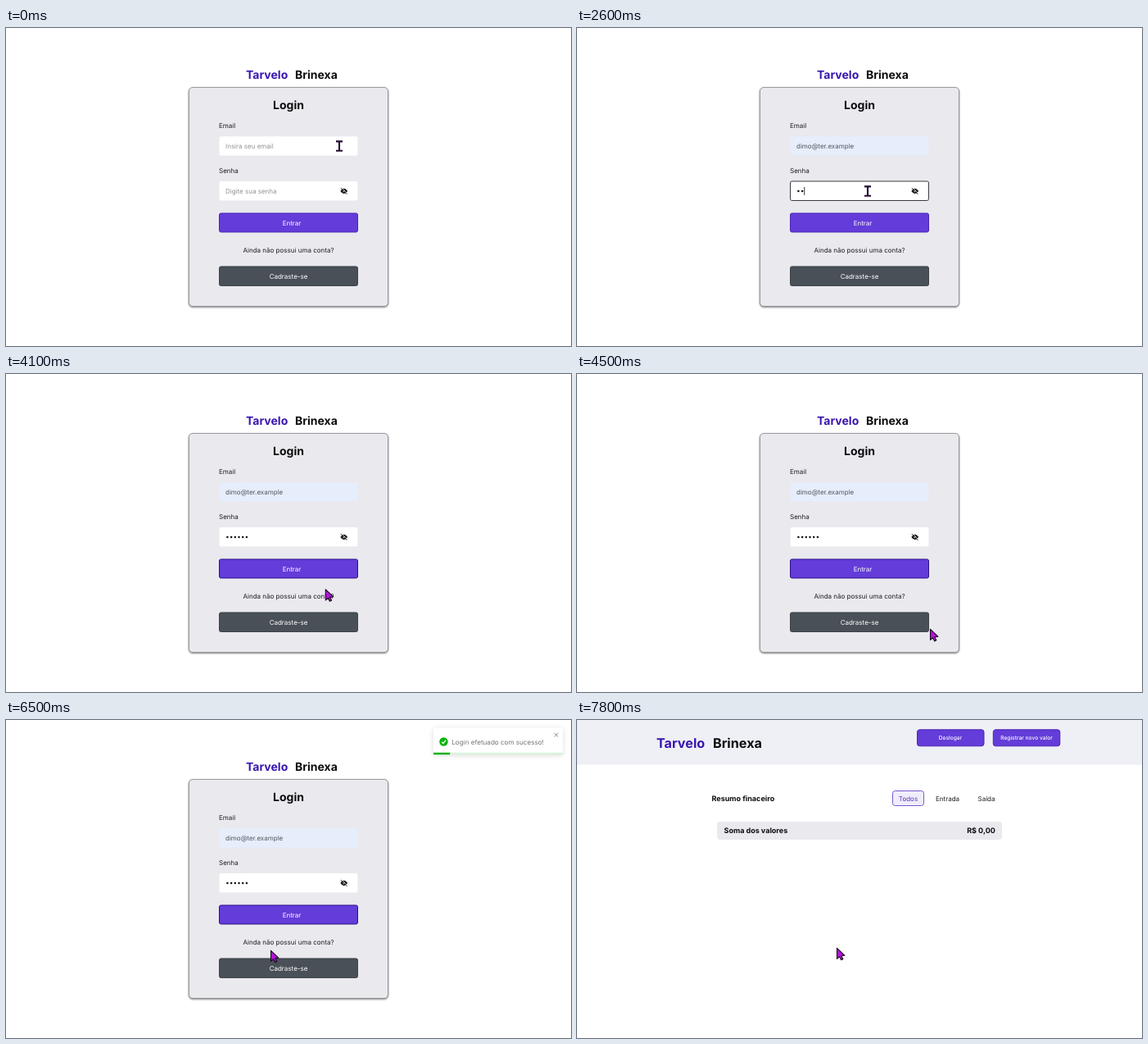
Recreate the animation shown at these times as an HTML page. Size 690x388 px, loop 8000 ms.

```html
<!DOCTYPE html>
<html lang="pt-BR">
<head>
<meta charset="utf-8">
<title>Login</title>
<style>
html, body { margin: 0; width: 100%; height: 100%; overflow: hidden; background: #fff; }
svg { display: block; width: 690px; height: 388px; }
text { font: 8px Inter, sans-serif; fill: #1c1f22; text-rendering: geometricPrecision; white-space: pre; }
.brand { font-weight: 700; font-size: 14px; fill: #0d0d10; }
.big { font-size: 16.2px; }
.violet { fill: #3a16b0; }
.bold { font-weight: 700; font-size: 9px; fill: #0d0d10; }
.mid { text-anchor: middle; }
.end { text-anchor: end; }
.white { fill: #fff; }
.hint { fill: #929292; }
.small { font-size: 6.65px; font-weight: 500; }
.card { fill: #e9e9ee; stroke: #8b8b90; stroke-width: .8; filter: drop-shadow(0 1px 1px #0008); }
.primary { fill: #643cd9; stroke: #4a25b4; }
.toast { fill: #fff; filter: drop-shadow(0 1px 3px #0002); }
</style>
</head>
<body>
<svg viewBox="0 0 690 388">
  <g id="login">
    <text class="brand violet" x="293" y="62">Tarvelo</text>
    <text class="brand" x="353" y="62">Brinexa</text>
    <rect class="card" x="223.5" y="72.5" width="243" height="267" rx="4.5"/>
    <text class="brand mid" x="345" y="99">Login</text>
    <text x="260" y="122">Email</text>
    <rect id="emailBox" x="260.5" y="132.3" width="169" height="23.5" rx="2"/>
    <text id="email" x="268" y="147"></text>
    <text x="260" y="176.5">Senha</text>
    <rect id="passBox" x="260.5" y="187" width="169" height="23.5" rx="2" fill="#fff"/>
    <text id="passHint" class="hint" x="268" y="201.5">Digite sua senha</text>
    <g id="dots"></g>
    <path d="M408.3 199Q412.7 192.5 417.2 199Q412.7 205.5 408.3 199Z" fill="#17171a"/>
    <circle cx="412.7" cy="199" r="1.2" fill="#fff"/>
    <path d="M409.6 195L417 202.4" stroke="#fff" stroke-width=".9"/>
    <path d="M409 195.2L416.4 202.8" stroke="#17171a" stroke-width="1"/>
    <rect id="caret" width=".9" height="10" fill="#222"/>
    <rect id="enter" x="260.5" y="226" width="169" height="23" rx="2"/>
    <text class="mid white" x="349" y="240.7">Entrar</text>
    <text class="mid" x="345" y="273.7">Ainda não possui uma conta?</text>
    <rect id="signup" x="260.5" y="291" width="169" height="23.5" rx="2" stroke="#3b4147"/>
    <text class="mid white" x="345" y="305.7">Cadraste-se</text>
  </g>
  <g id="toast">
    <rect class="toast" x="522" y="9.5" width="158" height="32.5" rx="2"/>
    <circle cx="534.5" cy="26.5" r="5.2" fill="#0ab30f"/>
    <path d="M532 26.6L533.9 28.5L537.2 24.6" fill="none" stroke="#fff" stroke-width="1.3"/>
    <text x="544.3" y="29.5" style="font-size:8.1px;fill:#757575">Login efetuado com sucesso!</text>
    <path d="M669.7 16L674.3 20.6M674.3 16L669.7 20.6" stroke="#888" stroke-width="1"/>
    <rect x="522" y="39.8" width="158" height="2.4" fill="#0ab30f" opacity=".15"/>
    <rect id="bar" x="522" y="39.8" width="158" height="2.4" fill="#0ab30f"/>
  </g>
  <g id="home">
    <rect width="690" height="54.5" fill="#eff0f5"/>
    <text class="brand big violet" x="97" y="33.5">Tarvelo</text>
    <text class="brand big" x="166" y="33.5">Brinexa</text>
    <rect class="primary" x="415.5" y="11.8" width="81.5" height="20" rx="3"/>
    <text class="mid white small" x="456" y="24.3">Deslogar</text>
    <rect class="primary" x="508.3" y="11.8" width="81.5" height="20" rx="3"/>
    <text class="mid white small" x="549" y="24.3">Registrar novo valor</text>
    <text class="bold" x="164.5" y="99">Resumo finaceiro</text>
    <rect x="385.5" y="86.5" width="38" height="18" rx="3" fill="#f0edfb" stroke="#7758cf"/>
    <text class="mid" x="404.5" y="98.8" style="fill:#5a35c4">Todos</text>
    <text x="438" y="98.8">Entrada</text>
    <text x="489.5" y="98.8">Saída</text>
    <rect x="171" y="124" width="348" height="22" rx="4" fill="#e9e9ee"/>
    <text class="bold" x="179.5" y="138">Soma dos valores</text>
    <text class="bold end" x="510.8" y="138">R$ 0,00</text>
  </g>
  <g id="pointer">
    <path id="arrow" d="M.5 .3V13.4L3.5 10.8L5.7 14.8L7.8 13.7L5.8 9.8L9.9 9.3Z" fill="#b314d6" stroke="#1c0524" stroke-width="1.1" stroke-linejoin="round"/>
    <path id="hand" d="M-1 .6Q0 -.8 1.2 .6V5L6.5 6.3Q8 7 7.8 9L6.6 14.8H-.2L-4 9.6Q-4.2 7.6 -1 9Z" fill="#c916e4" stroke="#1c0524" stroke-width="1.2" stroke-linejoin="round"/>
    <path id="beam" d="M-4 -5.6H4M0 -5.6V5.8M-4 5.8H4" stroke="#230a30" stroke-width="2.1" fill="none"/>
  </g>
</svg>
<script>
const el = {};
document.querySelectorAll('[id]').forEach(node => el[node.id] = node);
const set = (node, attrs) => { for (const k in attrs) node.setAttribute(k, attrs[k]); };
const show = (node, on) => node.style.display = on ? '' : 'none';

const LOOP = 8000, FOCUS_EMAIL = 300, PREVIEW = 1300, FILL = 1900, FOCUS_PASS = 2250,
  CLICK = 3850, TOAST_IN = 4400, BAR = 4765, TOAST_OUT = 6755, HOME = 7700, ANIM = 700;
const KEYS = [2460, 2560, 2760, 2960, 3130, 3300];
const PATH = [[0, 407, 144], [200, 407, 144], [550, 390, 145], [950, 390, 145], [1500, 364, 174],
  [1850, 364, 174], [2220, 355, 199], [3050, 355, 199], [3600, 374, 244], [3900, 374, 244],
  [4480, 431, 311], [4900, 432, 326], [5600, 432, 326], [5800, 432, 325], [6450, 323, 281],
  [6550, 323, 281], [6800, 320, 288], [7200, 319, 282], [7500, 317, 278]];

KEYS.forEach((_, i) => {
  const dot = document.createElementNS('http://www.w3.org/2000/svg', 'circle');
  set(dot, { cx: 270.4 + i * 4.7, cy: 199, r: 1.25, fill: '#111' });
  el.dots.append(dot);
});

const smooth = p => p * p * (3 - 2 * p);
const easeOut = p => 1 - (1 - p) ** 3;

// Eased value between [time, ...values] stops
function along(stops, t, ease) {
  const i = stops.findIndex(s => s[0] > t);
  if (i < 0) return stops[stops.length - 1].slice(1);
  if (i === 0) return stops[0].slice(1);
  const a = stops[i - 1], b = stops[i], p = ease((t - a[0]) / (b[0] - a[0]));
  return a.slice(1).map((v, k) => v + (b[k + 1] - v) * p);
}

// Offset and opacity of the notification, bouncing in and out
const ENTER = [[0, 1480, 0], [.6, -12, 1], [.75, 5, 1], [.9, -2.5, 1], [1, 0, 1]];
const LEAVE = [[0, 0, 1], [.2, -10, 1], [1, 988, 0]];

function render(t) {
  const home = t >= HOME;
  show(el.login, !home);
  show(el.home, home);

  const [x, y] = along(PATH, t, smooth);
  const over = (top, bottom) => !home && x > 260 && x < 430 && y > top && y < bottom;
  const onEnter = over(225, 249.5), onSignup = over(290.5, 315);
  const onInput = over(132, 156) || over(186.5, 211);
  set(el.pointer, { transform: `translate(${x} ${y})` });
  show(el.beam, onInput);
  show(el.hand, onEnter || onSignup);
  show(el.arrow, !onInput && !onEnter && !onSignup);

  const emailFocus = t >= FOCUS_EMAIL && t < FOCUS_PASS;
  const passFocus = t >= FOCUS_PASS && t < CLICK;
  const filled = t >= PREVIEW;
  const outline = on => on ? '#383a40' : 'none';
  set(el.emailBox, { fill: filled ? '#e6eefc' : '#fff', stroke: outline(emailFocus) });
  set(el.passBox, { stroke: outline(passFocus) });
  el.email.textContent = filled ? 'dimo@ter.example' : 'Insira seu email';
  el.email.style.fontSize = filled && t < FILL ? '6.6px' : '8px';
  el.email.style.fill = !filled ? '#929292' : t < FILL ? '#1c1f22' : '#55585e';

  const typed = KEYS.filter(k => k <= t).length;
  show(el.passHint, !typed);
  [...el.dots.children].forEach((dot, i) => show(dot, i < typed));

  const since = passFocus ? (typed ? KEYS[typed - 1] : FOCUS_PASS) : t >= FILL ? FILL : FOCUS_EMAIL;
  show(el.caret, (emailFocus || passFocus) && (t - since) % 1000 < 500 + 100 * passFocus);
  set(el.caret, passFocus
    ? { x: 268.3 + typed * 4.7 - .4, y: 194 }
    : { x: t >= FILL ? 338.8 : 268.3, y: 139.2 });

  set(el.enter, { fill: onEnter ? '#5731b2' : '#643cd9', stroke: t >= CLICK ? '#2c1288' : '#4a25b4' });
  set(el.signup, { fill: onSignup ? '#3c4349' : '#495057' });

  show(el.toast, t >= TOAST_IN && t < TOAST_OUT + ANIM);
  const [dx, alpha] = t < TOAST_OUT
    ? along(ENTER, (t - TOAST_IN) / ANIM, easeOut)
    : along(LEAVE, (t - TOAST_OUT) / ANIM, smooth);
  set(el.toast, { transform: `translate(${dx} 0)`, opacity: alpha });
  const left = Math.min(1, Math.max(0, (TOAST_OUT - t) / (TOAST_OUT - BAR)));
  set(el.bar, { width: 158 * left });
}

const start = performance.now();
(function frame() {
  render((performance.now() - start) % LOOP);
  requestAnimationFrame(frame);
})();
</script>
</body>
</html>
```
